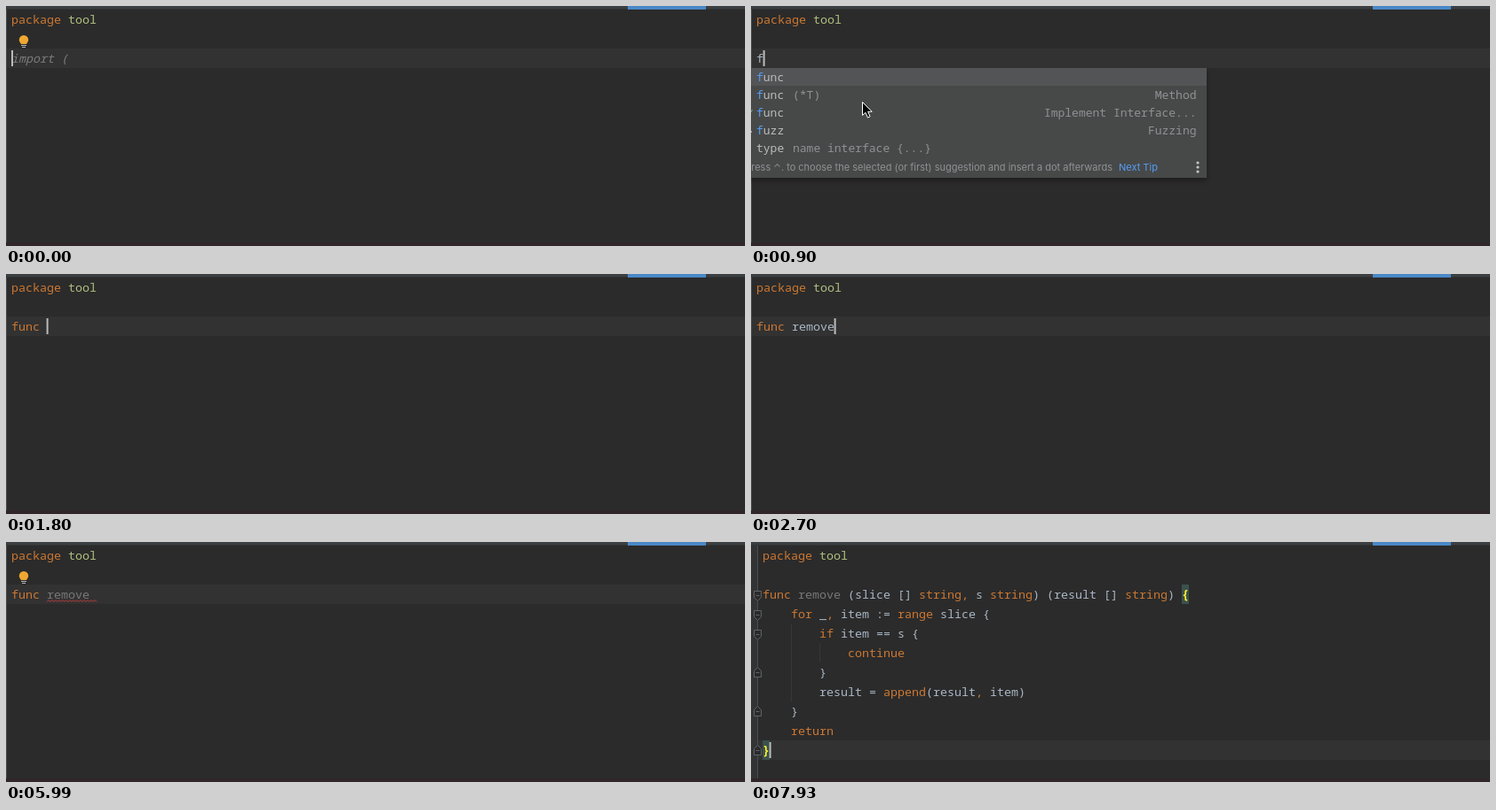
An HTML page for the animation above (8000 ms loop, 832x271 px).

```html
<!DOCTYPE html>
<html lang="en">
<head>
<meta charset="utf-8">
<title>Code completion</title>
<style>
  html, body { margin: 0; width: 100%; height: 100%; overflow: hidden; background: #2b2b2b; }
  svg { display: block; width: 832px; height: 271px; }
  text { white-space: pre; font: 13.333px "Noto Sans Mono", "DejaVu Sans Mono", monospace; }
  .list text { font-size: 13px; }
  .list .tip { font: 11px Inter, "Open Sans", sans-serif; }
  .ghost { font-style: italic; }
  .bold { font-weight: bold; }
</style>
</head>
<body>
<svg id="stage" viewBox="0 0 832 271">
  <defs>
    <filter id="shadow" x="-5%" y="-10%" width="110%" height="130%">
      <feDropShadow dx="0" dy="3" stdDeviation="3" flood-color="#000" flood-opacity=".35"/>
    </filter>
  </defs>
  <g id="scene"></g>
  <rect width="832" height="3" fill="#3c3f41"/>
  <rect y="3" width="832" height="1" fill="#333536"/>
  <rect x="700" width="88" height="4" fill="#4a88c7"/>
  <rect y="267" width="832" height="4" fill="#30262a"/>
</svg>
<script>
const LOOP = 8000, CHAR = 8, LINE = 22, LEFT = 6;
const COLOR = {
  plain: '#a9b7c6', keyword: '#cc7832', pkg: '#afbf7e', unused: '#787878', decl: '#b09d79',
  ghost: '#7b7b7b', brace: '#ffef28', braceBg: '#3b514d', error: '#bc3f3c',
  match: '#589df6', item: '#bbbbbb', hint: '#8f9193'
};

const SIGNATURE = '(slice [] string, s string) (result [] string) {';
const BODY = [
  '    for _, item := range slice {',
  '        if item == s {',
  '            continue',
  '        }',
  '        result = append(result, item)',
  '    }',
  '    return',
  '}'
];
const ITEMS = [
  ['func', '', ''],
  ['func', '(*T)', 'Method'],
  ['func', '', 'Implement Interface...'],
  ['fuzz', '', 'Fuzzing'],
  ['type', 'name interface {...}', '']
];

// Each step overrides the state left by the one before it.
const STEPS = [
  [0, { typed: '', col: 0, row: 2, caret: true, bulb: true, ghost: 'import', items: 0, shift: 0 }],
  [450, { caret: false }],
  [900, { typed: 'f', col: 1, caret: true, bulb: false, ghost: '', items: 5 }],
  [1050, { typed: 'fu', col: 2, items: 4 }],
  [1200, { typed: 'fun', col: 3, items: 3 }],
  [1500, { typed: 'func', col: 4, template: true }],
  [1800, { col: 5, items: 0, template: false }],
  [2100, { name: 're', col: 7 }],
  [2250, { name: 'rem', col: 8 }],
  [2550, { name: 'remov', col: 10 }],
  [2700, { name: 'remove', col: 11 }],
  [3000, { nameColor: COLOR.decl, waves: [[46, 101]] }],
  [3140, { nameColor: COLOR.unused }],
  [3890, { caret: false }],
  [4040, { caret: true, col: 12, waves: [[46, 94], [102, 109]] }],
  [4340, { waves: [[46, 102]] }],
  [4940, { caret: false, bulb: true }],
  [5390, { caret: true }],
  [5990, { caret: false }],
  [6430, { caret: true, ghost: 'body' }],
  [7480, { caret: false }],
  [7630, { caret: true, row: 10, col: 1, bulb: false, ghost: '', waves: [], shift: 7,
           nameColor: COLOR.plain, accepted: true }],
  [7930, { nameColor: COLOR.unused, analysed: true }]
];

const colX = col => LEFT + col * CHAR;
const rowTop = row => 4 + row * LINE;
const escapeText = s => s.replace(/&/g, '&amp;').replace(/</g, '&lt;');
const rect = (x, y, w, h, fill) => `<rect x="${x}" y="${y}" width="${w}" height="${h}" fill="${fill}"/>`;
const text = (x, y, s, fill, attrs = '') => `<text x="${x}" y="${y}" fill="${fill}" ${attrs}>${escapeText(s)}</text>`;
const code = (row, col, s, fill, attrs) => text(colX(col), rowTop(row) + 16, s, fill, attrs);

function highlighted(row, col, line, analysed) {
  const keyword = analysed
    ? /^(for|range|if|continue|return|string|append|,)$/
    : /^(for|range|if|continue|return|,)$/;
  let out = '';
  for (const m of line.matchAll(/\w+|,|[^\w\s,]+/g)) {
    out += code(row, col + m.index, m[0], keyword.test(m[0]) ? COLOR.keyword : COLOR.plain);
  }
  return out;
}

function wave([from, to]) {
  let d = `M${from} 67.5`;
  for (let x = from + 2, up = true; x <= to; x += 2, up = !up) d += `L${x} ${up ? 65.5 : 67.5}`;
  return `<path d="${d}" fill="none" stroke="${COLOR.error}"/>`;
}

function bulb() {
  return `<path d="M20 33a5.2 5.2 0 0 0-5.2 5.2c0 2 1.2 3 2.2 4.8h6c1-1.800 2.200-2.800 2.200-4.800A5.200 5.200 0 0 0 20 33z" fill="#f0a732"/>`
    + rect(17, 44, 6, 1, '#b5b7b9') + rect(18, 46, 4, 1, '#b5b7b9');
}

function foldMark(row, opening) {
  const y = rowTop(row) + (opening ? 13 : 11), dir = opening ? 1 : -1;
  return `<g transform="translate(.5 ${y}) scale(1 ${dir})" stroke="#606366">
    <path d="M-4-5.500H4V1.500L0 5.500L-4 1.500Z" fill="#2b2b2b"/><path d="M-2-.5H2"/></g>`;
}

function popup(prefix, count) {
  const footer = 70 + count * 20;
  let out = `<g class="list"><rect x="-20" y="70" width="533" height="${count * 20 + 24}" fill="#46484a" filter="url(#shadow)"/>`
    + rect(0, 70, 513, 20, '#525456');
  ITEMS.slice(0, count).forEach(([word, tail, note], i) => {
    const y = 85 + i * 20;
    const hit = word.startsWith(prefix) ? prefix.length : word === 'type' ? 0 : 1;
    out += text(6, y, word.slice(0, hit), COLOR.match)
      + text(6 + hit * 7.8, y, word.slice(hit), COLOR.item)
      + text(47, y, tail, COLOR.hint)
      + text(501.500, y, note, COLOR.hint, 'text-anchor="end"');
  });
  out += '<path d="M0 120L1.500 117" stroke="#78a878"/>';
  if (count > 3) out += rect(0, 141, 1, 2, '#a0a2a4');
  out += text(407, footer + 16, 'Press ⌃. to choose the selected (or first) suggestion and insert a dot afterwards',
    COLOR.hint, 'class="tip" text-anchor="end"')
    + text(414, footer + 16, 'Next Tip', COLOR.match, 'class="tip"');
  for (const dy of [7, 12, 17]) out += `<circle cx="503" cy="${footer + dy}" r="1.600" fill="#c3c5c7"/>`;
  return out + `<path d="M125.500 108.500v15l3.400-3.200 2.600 5.700 2.600-1.200-2.500-5.500h4.600z" fill="#000" stroke="#fff"/></g>`;
}

function ghostBody() {
  const attrs = 'class="ghost"';
  return code(2, 12, SIGNATURE, COLOR.ghost, attrs)
    + BODY.map((line, i) => code(3 + i, line.search(/\S/), line.trim(), COLOR.ghost, attrs)).join('');
}

function acceptedBody(analysed) {
  const braceColor = analysed ? COLOR.brace : COLOR.plain;
  const braceAttrs = analysed ? 'class="bold"' : '';
  let out = rect(colX(4), rowTop(4), 1, LINE * 4, '#373737')
    + rect(colX(8), rowTop(5), 1, LINE, '#373737')
    + rect(colX(59), rowTop(2), CHAR, LINE, COLOR.braceBg)
    + rect(colX(0), rowTop(10), CHAR, LINE, COLOR.braceBg)
    + highlighted(2, 12, SIGNATURE.slice(0, -1), analysed)
    + code(2, 59, '{', braceColor, braceAttrs)
    + code(10, 0, '}', braceColor, braceAttrs);
  BODY.slice(0, -1).forEach((line, i) => out += highlighted(3 + i, 0, line, analysed));
  if (analysed) {
    for (const row of [2, 3, 4]) out += foldMark(row, true);
    for (const row of [6, 8, 10]) out += foldMark(row, false);
  }
  return out;
}

function draw(s) {
  let out = rect(-7, 0, 7, 271, '#313335')
    + rect(0, rowTop(s.row), 832, LINE, '#323232')
    + rect(0, 0, 1, 271, '#4b4d4f')
    + code(0, 0, 'package', COLOR.keyword) + code(0, 8, 'tool', COLOR.pkg);
  if (s.template) out += rect(LEFT, 50, 32, 20, '#344134');
  out += code(2, 0, s.typed, s.typed === 'func' ? COLOR.keyword : COLOR.plain);
  if (s.name) out += code(2, 5, s.name, s.nameColor || COLOR.plain);
  out += (s.waves || []).map(wave).join('');
  if (s.ghost === 'import') out += code(2, 0, 'import (', COLOR.ghost, 'class="ghost"');
  if (s.ghost === 'body') out += ghostBody();
  if (s.accepted) out += acceptedBody(s.analysed);
  if (s.bulb) out += bulb();
  if (s.caret) out += rect(colX(s.col) - (s.col ? .4 : 0), rowTop(s.row) + 2, 2, 18, '#bbbbbb');
  if (s.items) out += popup(s.typed, s.items);
  return `<g transform="translate(${s.shift} 0)">${out}</g>`;
}

const scene = document.getElementById('scene');
const start = performance.now();
let shown = -1;

function frame() {
  const time = (performance.now() - start) % LOOP;
  const count = STEPS.filter(([at]) => at <= time).length;
  if (count !== shown) {
    shown = count;
    scene.innerHTML = draw(Object.assign({}, ...STEPS.slice(0, count).map(step => step[1])));
  }
  requestAnimationFrame(frame);
}
frame();
</script>
</body>
</html>
```
